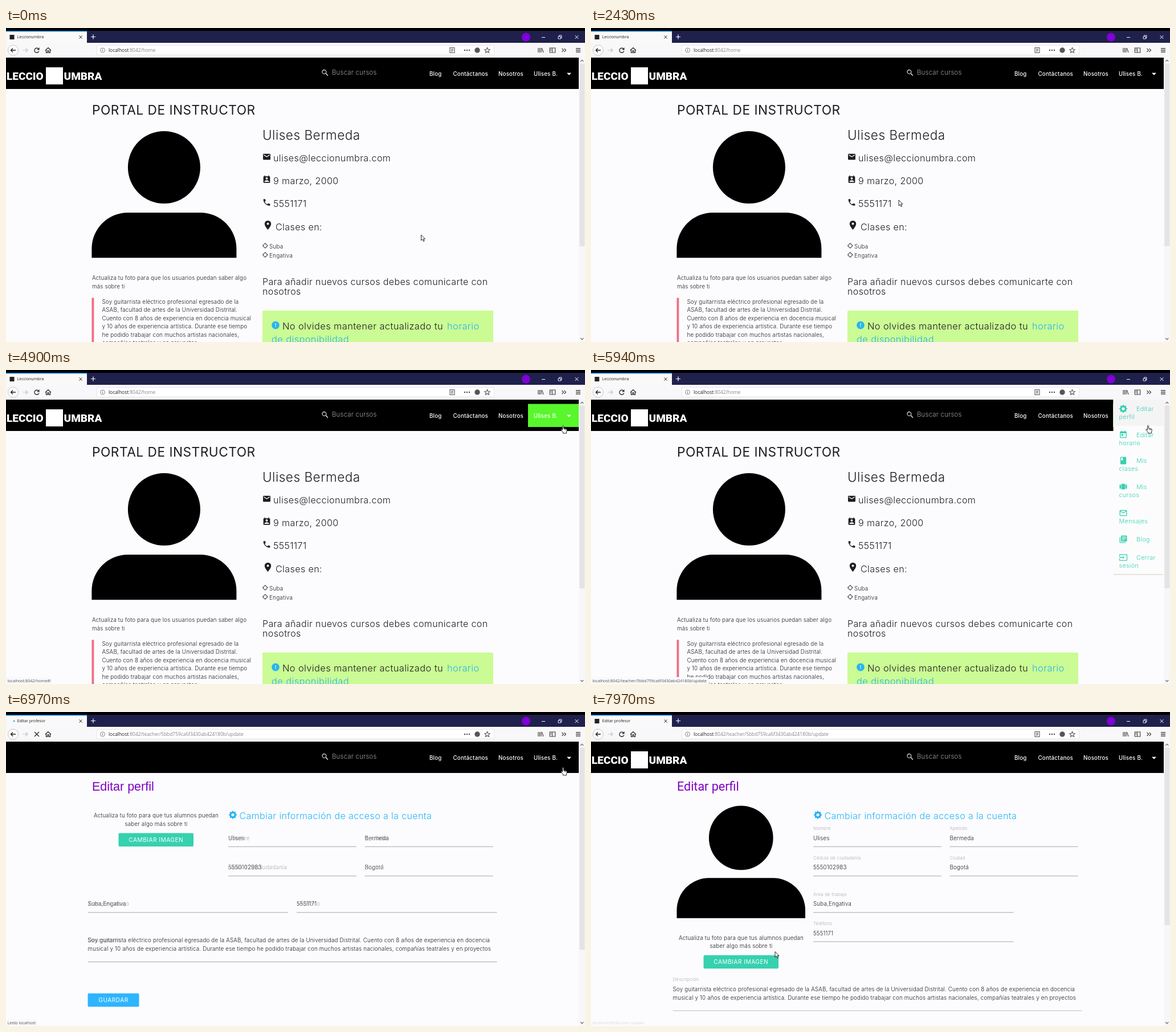
These frames come from a looping animation (1016 by 551 pixels, 8 s). An HTML page with a canvas:

```html
<!DOCTYPE html>
<html lang="es">
<head>
<meta charset="utf-8">
<title>Portal de instructor</title>
<style>
html, body { margin: 0; width: 100%; height: 100%; overflow: hidden; background: #fcfcfe; }
canvas { display: block; }
</style>
</head>
<body>
<canvas id="stage" width="1016" height="551"></canvas>
<script>
const ctx = document.getElementById('stage').getContext('2d');
const LOOP = 8000, TAU = Math.PI * 2;
const BODY = 'Inter, sans-serif', CHROME = '"Open Sans", sans-serif';
const INK = '#1d1d20', TEAL = '#36d1ae', BLUE = '#25b3f5', PAGE = '#fcfcfe';
const PATH = 'localhost:8042/teacher/5bbd759ca6f3430ab424180b/update';

// Moments of the session, in ms
const HOVER = 4530, OPEN = 5070, CLICK = 6170, LOAD = 6240, PAINT = 6600,
      FONTS = 7080, FLOAT = 7130, IMAGE = 7250, READY = 7450;

const clamp = v => Math.max(0, Math.min(1, v));
const ramp = (t, from, len) => clamp((t - from) / len);
const mix = (a, b, k) => a + (b - a) * k;
const easeOut = k => 1 - (1 - k) ** 3;
const smooth = k => k * k * (3 - 2 * k);

function rect(x, y, w, h, color, r = 0) {
  ctx.fillStyle = color;
  ctx.beginPath();
  ctx.roundRect(x, y, w, h, r);
  ctx.fill();
}

function disc(x, y, r, color) {
  ctx.fillStyle = color;
  ctx.beginPath();
  ctx.arc(x, y, r, 0, TAU);
  ctx.fill();
}

function ring(x, y, r, color, lw = 1) {
  ctx.strokeStyle = color;
  ctx.lineWidth = lw;
  ctx.beginPath();
  ctx.arc(x, y, r, 0, TAU);
  ctx.stroke();
}

function stroke(d, x, y, color, lw = 1) {
  ctx.save();
  ctx.translate(x, y);
  ctx.strokeStyle = color;
  ctx.lineWidth = lw;
  ctx.stroke(new Path2D(d));
  ctx.restore();
}

function fill(d, x, y, color, scale = 1) {
  ctx.save();
  ctx.translate(x, y);
  ctx.scale(scale, scale);
  ctx.fillStyle = color;
  ctx.fill(new Path2D(d), 'evenodd');
  ctx.restore();
}

// y is the optical middle of the line
function text(s, x, y, size, color = INK, o = {}) {
  ctx.font = `${o.weight || 400} ${size}px ${o.font || BODY}`;
  ctx.letterSpacing = (o.track ?? 0.024) * size + 'px';
  ctx.textAlign = o.align || 'left';
  ctx.fillStyle = color;
  ctx.fillText(s, x, y + size * 0.35);
}
const light = (s, x, y, size, color) => text(s, x, y, size, color, { weight: 300 });
const small = (s, x, y, align = 'left') => text(s, x, y, 9.75, INK, { weight: 300, track: 0.02, align });
const ui = (s, x, y, size, color = '#222') => text(s, x, y, size, color, { font: CHROME, track: 0 });

// Icons on a 24 unit grid
const ICONS = {
  search: 'M16 14h-1l-.5-.5A6.5 6.5 0 1 0 13.5 14.5l.5.5v1l5 5 1.5-1.5zM9.5 14a4.5 4.5 0 1 1 0-9 4.5 4.5 0 0 1 0 9z',
  mail: 'M4 4H20a2 2 0 0 1 2 2V18a2 2 0 0 1-2 2H4a2 2 0 0 1-2-2V6a2 2 0 0 1 2-2zM20 8V6l-8 5-8-5v2l8 5z',
  mailLine: 'M4 4H20a2 2 0 0 1 2 2V18a2 2 0 0 1-2 2H4a2 2 0 0 1-2-2V6a2 2 0 0 1 2-2zM20 18V8l-8 5-8-5V18zM12 11l8-5H4z',
  contact: 'M19 3h-1V1h-2v2H8V1H6v2H5a2 2 0 0 0-2 2V19a2 2 0 0 0 2 2H19a2 2 0 0 0 2-2V5a2 2 0 0 0-2-2zM12 6a3 3 0 1 1 0 6 3 3 0 0 1 0-6zM18 18H6v-1c0-2 4-3 6-3s6 1 6 3z',
  phone: 'M6.6 10.8a15 15 0 0 0 6.6 6.6l2.2-2.2a1 1 0 0 1 1-.3 11 11 0 0 0 3.6.6 1 1 0 0 1 1 1V20a1 1 0 0 1-1 1A17 17 0 0 1 3 4a1 1 0 0 1 1-1h3.5a1 1 0 0 1 1 1 11 11 0 0 0 .6 3.6 1 1 0 0 1-.3 1z',
  place: 'M12 2a7 7 0 0 0-7 7c0 5.2 7 13 7 13s7-7.8 7-13a7 7 0 0 0-7-7zM12 11.5a2.5 2.5 0 1 1 0-5 2.5 2.5 0 0 1 0 5z',
  day: 'M19 3h-1V1h-2v2H8V1H6v2H5a2 2 0 0 0-2 2V19a2 2 0 0 0 2 2H19a2 2 0 0 0 2-2V5a2 2 0 0 0-2-2zM19 19H5V8H19zM7 10h5v5H7z',
  book: 'M18 2H6a2 2 0 0 0-2 2V20a2 2 0 0 0 2 2H18a2 2 0 0 0 2-2V4a2 2 0 0 0-2-2zM6 4h5v8l-2.5-1.5L6 12z',
  carousel: 'M7 19H17V4H7zM2 17H6V6H2zM18 6V17H22V6z',
  library: 'M4 6H2V20a2 2 0 0 0 2 2H18v-2H4zM20 2H8a2 2 0 0 0-2 2V16a2 2 0 0 0 2 2H20a2 2 0 0 0 2-2V4a2 2 0 0 0-2-2zM19 11H9V9H19zM15 15H9v-2h6zM19 7H9V5H19z',
  exit: 'M21 3H3a2 2 0 0 0-2 2V9H3V5H21V19H3V15H1v4a2 2 0 0 0 2 2H21a2 2 0 0 0 2-2V5a2 2 0 0 0-2-2zM11 16l4-4-4-4v3H1v2H11z'
};
const icon = (name, x, y, size, color) =>
  fill(ICONS[name], x - size / 2, y - size / 2, color, size / 24);

// Toothed wheel with an optional hole
function cog(x, y, r, color, teeth, depth, hole) {
  ctx.fillStyle = color;
  ctx.beginPath();
  for (let i = 0; i < teeth * 4; i++) {
    const a = (i - 0.5) / (teeth * 4) * TAU + TAU / 4;
    const d = i % 4 < 2 ? r : r * depth;
    ctx.lineTo(x + d * Math.cos(a), y + d * Math.sin(a));
  }
  ctx.closePath();
  ctx.moveTo(x + hole, y);
  ctx.arc(x, y, hole, 0, TAU);
  ctx.fill('evenodd');
}
const gear = (x, y, r, color) => cog(x, y, r, color, 8, 0.79, r * 0.37);

function target(x, y) {
  ring(x, y, 3.4, INK, 0.9);
  stroke('M-5 0H-3M3 0H5M0-5V-3M0 3V5', x, y, INK, 0.9);
}

function avatar(x, y, w) {
  disc(x + w / 2, y + w / 4, w / 4, '#000');
  rect(x, y + w * 0.5625, w, w * 0.3125, '#000', [w / 4, w / 4, 0, 0]);
}

function browser(t) {
  const edit = t >= PAINT, busy = t >= LOAD && t < READY;
  rect(0, 0, 1016, 5, '#000');
  rect(0, 5, 1016, 21, '#20204c');
  rect(0, 5, 142, 21, '#f9f9fa');
  rect(0, 5, 142, 1.6, '#0a9cf0');
  if (busy) disc(11 + 3 * Math.cos((t - 6970) / 230 * Math.PI), 16, 1.3, '#2a8fe8');
  else rect(6.5, 12, 8, 8, '#222');
  ui(edit ? 'Editar profesor' : 'Leccionumbra', 19.5, 16, 7.1);
  stroke('M-2.7-2.7L2.7 2.7M2.7-2.7L-2.7 2.7', 131, 16, '#333');
  stroke('M-4 0H4M0-4V4', 153, 15.5, '#fff', 1.2);
  disc(912.5, 16, 7.5, '#8000d7');
  stroke('M-3 0H3', 943, 16.5, '#fff');
  stroke('M-3-1H1.5V3H-3ZM-1.5-1V-3H3V1.5H1.5', 972, 16, '#fff', 0.9);
  stroke('M-3-3L3 3M3-3L-3 3', 1001.5, 16, '#fff');

  rect(0, 26, 1016, 26, '#f8f8fa');
  disc(12.5, 39, 9, '#fff');
  ring(12.5, 39, 9, '#b5b5b8', 0.8);
  stroke('M4.5 0H-4M-.5-3.5L-4 0L-.5 3.5', 12.5, 39, '#222', 1.4);
  stroke('M-4.5 0H4M.5-3.5L4 0L.5 3.5', 34, 39, '#c2c2c5', 1.2);
  if (busy) stroke('M-4-4L4 4M4-4L-4 4', 54, 39, '#333', 1.5);
  else {
    stroke('M3.3-2A4 4 0 1 0 3.8 1.5', 54, 39, '#333', 1.4);
    fill('M4.6-5V-.6H.2Z', 54, 39, '#333');
  }
  stroke('M-5 .3L0-4.3L5 .3M-3.5-.5V4.3H-1V1H1V4.3H3.5V-.5', 74, 39, '#333', 1.3);

  rect(159, 30, 698, 17.5, '#fff', 1);
  stroke('M.5.5H697.5V17H.5Z', 159, 30, '#e0e0e3', 0.8);
  ring(169.5, 39, 4, '#666', 0.8);
  stroke('M0-.7V2.2M0-2.4V-1.4', 169.5, 39, '#666');
  const host = 'localhost';
  ui(host, 180, 39.2, 8.4);
  const w = ctx.measureText(host).width;
  ui(edit ? PATH.slice(host.length) : ':8042/home', 180 + w, 39.2, 8.4, '#85858a');
  if (!busy) stroke('M-4-4.5H4V4.5H-4ZM-2-2H2M-2 0H2M-2 2H1', 783, 39, '#555', 1.1);
  for (let i = -1; i <= 1; i++) disc(809 + i * 4, 39, 1.2, '#444');
  disc(827, 39, 4.7, '#55555a');
  stroke('M0-4.6L1.4-1.5L4.7-1.2L2.2 1L3 4.3L0 2.5L-3 4.3L-2.2 1L-4.7-1.2L-1.4-1.5Z', 844.5, 39, '#555', 1.1);
  stroke('M-4-4V4M-1.5-4V4M1-4V4M2.5-3.5L5 4', 938, 39, '#444', 1.2);
  stroke('M-4.7-4H4.7V4H-4.7ZM-.5-4V4M-3.2-1.8H-2M-3.2.2H-2', 959, 39, '#444', 1.2);
  stroke('M-3.5-3L-.5 0L-3.5 3M.5-3L3.5 0L.5 3', 979, 39, '#444', 1.2);
  stroke('M-4-3H4M-4 0H4M-4 3H4', 1004, 39, '#444', 1.3);
}

function scrollbar(end) {
  rect(1005, 52, 11, 499, '#f7f7f9');
  rect(1006.5, 62.5, 9, end - 62.5, '#e4e4e7');
  stroke('M-2.5 1.3L0-1.3L2.5 1.3', 1010.8, 57.5, '#505050', 1.1);
  stroke('M-2.5-1.3L0 1.3L2.5-1.3', 1010.8, 545.5, '#505050', 1.1);
}

function navbar(logo, hover) {
  rect(0, 52, 1005, 55, '#000');
  if (logo) {
    const o = { weight: 900, font: 'Roboto, sans-serif', track: 0 };
    text('LECCIO', 1, 84, 19, '#fff', o);
    rect(70, 69, 30, 30, '#fff');
    text('UMBRA', 101.5, 84, 19, '#fff', o);
  }
  icon('search', 560, 78.5, 15, '#d8d8d8');
  light('Buscar cursos', 572, 78.5, 11.3, '#a2a2a2');
  if (hover > 0) {
    ctx.globalAlpha = hover;
    rect(916, 59.5, 89, 40.5, '#58f72c');
    ctx.globalAlpha = 1;
  }
  const links = [['Blog', 743], ['Contáctanos', 784.5], ['Nosotros', 864], ['Ulises B.', 926]];
  for (const [s, x] of links) text(s, x, 80.3, 9.7, '#fff', { weight: 500 });
  fill('M-4-2H4L0 2Z', 988, 80.7, '#fff');
}

function home() {
  text('PORTAL DE INSTRUCTOR', 151, 144, 22.7, INK, { track: 0.022 });
  avatar(150.4, 181, 254);
  small('Actualiza tu foto para que los usuarios puedan saber algo', 151, 439);
  small('más sobre ti', 151, 453.5);
  rect(150.5, 473.5, 3.8, 78, '#ee6e83');
  [
    'Soy guitarrista eléctrico profesional egresado de la',
    'ASAB, facultad de artes de la Universidad Distrital.',
    'Cuento con 8 años de experiencia en docencia musical',
    'y 10 años de experiencia artística. Durante ese tiempo',
    'he podido trabajar con muchos artistas nacionales,',
    'compañías teatrales y en proyectos'
  ].forEach((s, i) => small(s, 168.5, 480.5 + i * 14.4));

  light('Ulises Bermeda', 450, 188, 22.5);
  [
    ['mail', 'ulises@leccionumbra.com'],
    ['contact', '9 marzo, 2000'],
    ['phone', '5551171']
  ].forEach(([name, s], i) => {
    icon(name, 457.5, 226 + i * 40, 15.6, INK);
    light(s, 469, 228.3 + i * 40, 16.1);
  });
  icon('place', 459.5, 346, 19.5, INK);
  light('Clases en:', 473, 349.5, 16.1);
  ['Suba', 'Engativa'].forEach((s, i) => {
    target(454.8, 382 + i * 16);
    light(s, 462, 383.2 + i * 16, 9.9);
  });
  light('Para añadir nuevos cursos debes comunicarte con', 450, 445, 16);
  light('nosotros', 450, 462, 16);
  rect(450, 495.7, 405, 60, '#cbfb94', 2);
  cog(473, 521.5, 7.2, BLUE, 12, 0.88, 0);
  stroke('M0-3.5V.8M0 2V3.5', 473, 521.5, '#cbfb94', 1.5);
  light('No olvides mantener actualizado tu', 485, 523.5, 16.4);
  light('horario', 774, 523.5, 16.4, BLUE);
  light('de disponibilidad', 466, 546.5, 16.4, BLUE);
}

function menu(t) {
  const shown = easeOut(ramp(t, OPEN, 300)) * (1 - ramp(t, CLICK, 225));
  if (shown <= 0) return;
  const items = [
    ['', 68, 'Editar', 'perfil'], ['day', 113.5, 'Editar', 'horario'],
    ['book', 159, 'Mis', 'clases'], ['carousel', 205, 'Mis', 'cursos'],
    ['mailLine', 251, '', 'Mensajes'], ['library', 297, 'Blog', ''],
    ['exit', 329, 'Cerrar', 'sesión']
  ];
  ctx.save();
  ctx.globalAlpha = shown;
  ctx.beginPath();
  ctx.rect(916, 52, 89.5, 308 * shown);
  ctx.clip();
  rect(916.5, 52, 88.5, 307, '#fcfcfd');
  rect(916.5, 52, 88.5, 46, '#f4f4f4');
  rect(917, 358, 87, 1.5, '#dcdccb');
  for (const [name, y, a, b] of items) {
    if (name) icon(name, 934, y, 15.5, TEAL);
    else gear(934, y, 7, TEAL);
    light(a, 957, y + 0.5, 10.9, TEAL);
    light(b, 926.5, y + 14.5, 10.9, TEAL);
  }
  ctx.restore();
}

function field(label, value, x, y, w, up) {
  if (value) small(value, x, y);
  light(label, x, y - 17 * up, mix(9.75, 7.9, up), '#adadb2');
  if (w) rect(x, y + 14.3, w, 0.9, '#a5a5ae');
}

function button(s, x, y, w, color) {
  rect(x, y, w, 23.5, color, 2);
  text(s, x + w / 2, y + 12, 10.2, '#fff', { align: 'center', track: 0.045 });
}

function editPage(t) {
  const img = t >= IMAGE, up = smooth(ramp(t, FLOAT, 200));
  const font = t >= FONTS ? 'Roboto, sans-serif' : '"Liberation Sans", sans-serif';
  text('Editar perfil', 151, 130.3, 21.5, '#7d00c2', { font, track: 0 });
  if (img) avatar(150.5, 164.5, 225.5);
  const y = img ? 214.3 : 0;
  small('Actualiza tu foto para que tus alumnos puedan', 263.5, 182 + y, 'center');
  small('saber algo más sobre ti', 263.5, 196.3 + y, 'center');
  button('CAMBIAR IMAGEN', 197.5, 212.5 + y, 131.5, TEAL);

  gear(398, 180.5, 7, BLUE);
  light('Cambiar información de acceso a la cuenta', 409.5, 182.5, 16, BLUE);
  field('Nombre', 'Ulises', 390, 221.5, 225, up);
  field('Apellido', 'Bermeda', 629.5, 221.5, 225, up);
  field('Cédula de ciudadanía', '5550102983', 390, 273, 225, up);
  field('Ciudad', 'Bogotá', 629.5, 273, 225, up);
  field('Área de trabajo', 'Suba,Engativa', img ? 390 : 143.5, 337, 351.5, up);
  field('Teléfono', '5551171', img ? 390 : 510, img ? 388.3 : 337, 351.5, up);

  const d = img ? 85.7 : 0;
  field('Descripción', '', 143.5, 401 + d, 0, up);
  small('Soy guitarrista eléctrico profesional egresado de la ASAB, facultad de artes de la Universidad Distrital. Cuento con 8 años de experiencia en docencia', 143.5, 401 + d);
  small('musical y 10 años de experiencia artística. Durante ese tiempo he podido trabajar con muchos artistas nacionales, compañías teatrales y en proyectos', 143.5, 415.5 + d);
  rect(143.5, 438 + d, 718, 0.9, '#a5a5ae');
  button('GUARDAR', 143.5, 493.8 + d, 90, '#2eb5fd');
}

function status(t) {
  let s = '';
  if (t >= 7550) s = 'localhost:8042/user-update';
  else if (t >= 7350) return;
  else if (t >= PAINT) s = 'Leído localhost';
  else if (t >= OPEN + 60) s = PATH;
  else if (t >= HOVER + 40) s = 'localhost:8042/home#!';
  else return;
  ctx.globalAlpha = 1 - 0.8 * ramp(t, 7840, 130);
  ctx.font = `400 7.1px ${CHROME}`;
  ctx.letterSpacing = '0px';
  rect(0, 539, ctx.measureText(s).width + 5, 12, '#f9f9fb', [0, 2, 0, 0]);
  ui(s, 2.5, 545.3, 7.1, '#555');
  ctx.globalAlpha = 1;
}

// Pointer stops: time, x, y
const STOPS = [
  [0, 728.5, 363], [30, 728.5, 363], [800, 578, 498], [1180, 188, 520], [1600, 500, 534],
  [1670, 500, 534], [2430, 540, 302], [2500, 541, 293], [2750, 690, 228], [3020, 396, 188],
  [3300, 692, 176], [3330, 692, 176], [4130, 962, 106], [4170, 962, 106], [4330, 968, 102],
  [4530, 968, 102], [4900, 977.5, 97], [7000, 977.5, 97], [7780, 323, 420.5], [8000, 323, 420.5]
];

function pointer(t) {
  const i = STOPS.findIndex(s => s[0] > t);
  const [t0, x0, y0] = STOPS[i - 1], [t1, x1, y1] = STOPS[i];
  const k = smooth((t - t0) / (t1 - t0));
  const x = mix(x0, x1, k), y = mix(y0, y1, k);
  const hand = t >= HOVER && t < 7030;
  const d = hand
    ? 'M-1 1Q0-.6 1 1V5.5L5.5 6.3Q7 6.8 6.8 8.5L6 12V14H0V12L-3.6 8.2Q-3.8 6.6-2.4 6.9L-1 8.2Z'
    : 'M0 0V9.8L2.3 7.7L4 11.5L5.6 10.8L4 7.1H7Z';
  fill(d, x, y, '#fff');
  stroke(d, x, y, '#111', 0.9);
  if (hand) stroke('M2.8 6V8.5M4.7 6.3V8.5', x, y, '#111', 0.7);
}

function draw(t) {
  const edit = t >= PAINT;
  rect(0, 0, 1016, 551, PAGE);
  if (edit) editPage(t); else home();
  navbar(!edit || t >= FONTS, edit ? 0 : ramp(t, HOVER, 300));
  menu(t);
  scrollbar(!edit ? 383 : t >= IMAGE ? 374 : 417);
  browser(t);
  status(t);
  pointer(t);
}

function tick() {
  draw(performance.now() % LOOP);
  requestAnimationFrame(tick);
}
tick();
</script>
</body>
</html>
```
